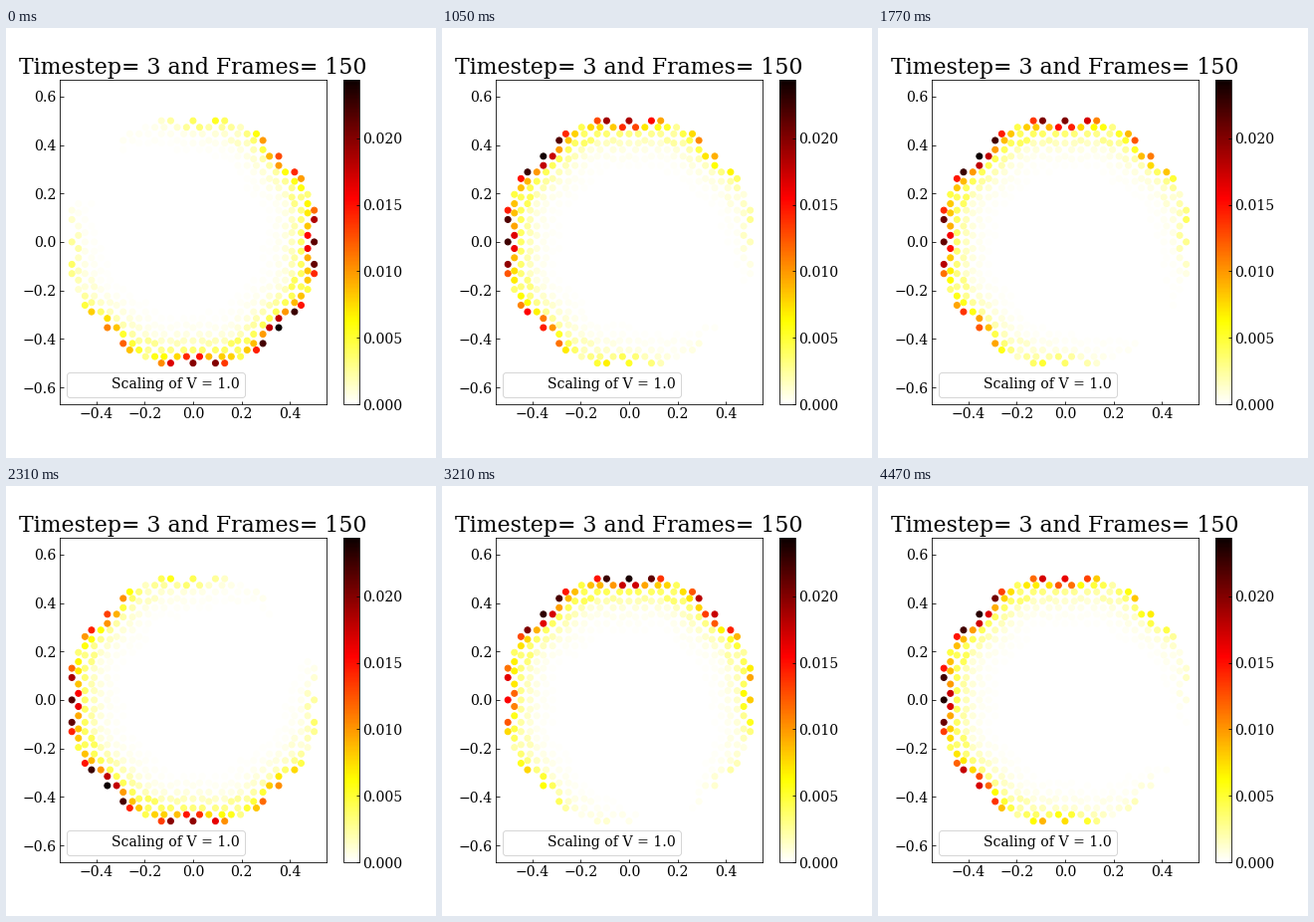
Animation, 432 px wide and 432 px high, one loop 4500 ms. Source, as a matplotlib script:

```python
import numpy as np
import matplotlib.pyplot as plt
from matplotlib.animation import FuncAnimation
from matplotlib.lines import Line2D

SIZE, DPI = 432, 72
FRAMES, INTERVAL = 150, 30
ROOT2 = np.sqrt(2)
RADIUS = 6 + 5 * ROOT2        # inner radius of the octagon, in tile edges
PEAK = 0.02442

# Relative edge-state weight by (depth, offset along the side)
EDGE_WEIGHTS = [
    (0, 0, 1.0), (0, 2.414, 0.93), (0, 3.414, 0.61),
    (0.707, 0.707, 0.73), (0.707, 1.707, 0.41), (0.707, 3.121, 0.36),
    (0.707, 4.121, 0.35), (0.707, 5.121, 0.19), (2.121, 4.121, 0.17),
]

plt.rcParams.update({
    "font.family": "DejaVu Serif",
    "font.size": 14,
    "xtick.direction": "in",
    "ytick.direction": "in",
})


def fold(x, y):
    """Map points into one 22.5 degree wedge of the octagon."""
    u = np.maximum(abs(x), abs(y))
    v = np.minimum(abs(x), abs(y))
    past = v > u * np.tan(np.pi / 8)
    return (np.where(past, (u + v) / ROOT2, u),
            np.where(past, (u - v) / ROOT2, v))


def octagonal_tiling():
    """Cut-and-project vertices of the eightfold tiling inside an octagon."""
    n = np.stack(np.meshgrid(*[np.arange(-8, 9)] * 4), -1).reshape(-1, 4)
    angle = np.arange(4) * np.pi / 4
    x, y = n @ np.cos(angle), n @ np.sin(angle)
    px, py = n @ np.cos(3 * angle), n @ np.sin(3 * angle)
    window = fold(px, py)[0] < (1 + ROOT2) / 2
    inside = fold(x, y)[0] < RADIUS + 0.01
    keep = window & inside
    return x[keep], y[keep]


def site_weights(x, y):
    u, v = fold(x, y)
    depth = RADIUS - u
    weight = np.where(depth < 1.5, 0.17, 0.1 * np.exp((2.1 - depth) / 1.1))
    for d, offset, value in EDGE_WEIGHTS:
        weight[(abs(depth - d) < 0.05) & (abs(v - offset) < 0.05)] = value
    return weight


x, y = octagonal_tiling()
theta = np.arctan2(y, x)
weight = site_weights(x, y)


def density(i):
    """Broad packet running clockwise around the edge."""
    centre = np.radians(-40 - 15.1 * i - 0.0032 * i * i)
    return PEAK * weight * np.cos((theta - centre) / 2) ** 2.1 \
        if False else PEAK * weight * (0.5 + 0.5 * np.cos(theta - centre)) ** 1.05


def px_rect(left, bottom, width, height):
    return [v / SIZE for v in (left, bottom, width, height)]


fig = plt.figure(figsize=(SIZE / DPI, SIZE / DPI), dpi=DPI, facecolor="white")
ax = fig.add_axes(px_rect(54, 54, 267.84, 326.16))
bar_ax = fig.add_axes(px_rect(338.6, 54, 16.3, 326.16))

half = 0.55
ax.set_xlim(-half, half)
ax.set_ylim(-half * 326.16 / 267.84, half * 326.16 / 267.84)
ax.set_xticks([-0.4, -0.2, 0, 0.2, 0.4])
ax.set_yticks([-0.6, -0.4, -0.2, 0, 0.2, 0.4, 0.6])
ax.set_title("Timestep= 3 and Frames= 150", fontsize=22)

scale = 0.5 / RADIUS
dots = ax.scatter(x * scale, y * scale, c=density(0), s=36,
                  cmap="hot_r", vmin=0, vmax=PEAK)
fig.colorbar(dots, cax=bar_ax, ticks=[0, 0.005, 0.01, 0.015, 0.02])
ax.legend([Line2D([], [], linestyle="none")], ["Scaling of V = 1.0"],
          loc="lower left")


def update(i):
    dots.set_array(density(i))
    return (dots,)


anim = FuncAnimation(fig, update, frames=FRAMES, interval=INTERVAL,
                     repeat=True, repeat_delay=0)
plt.show()
```
